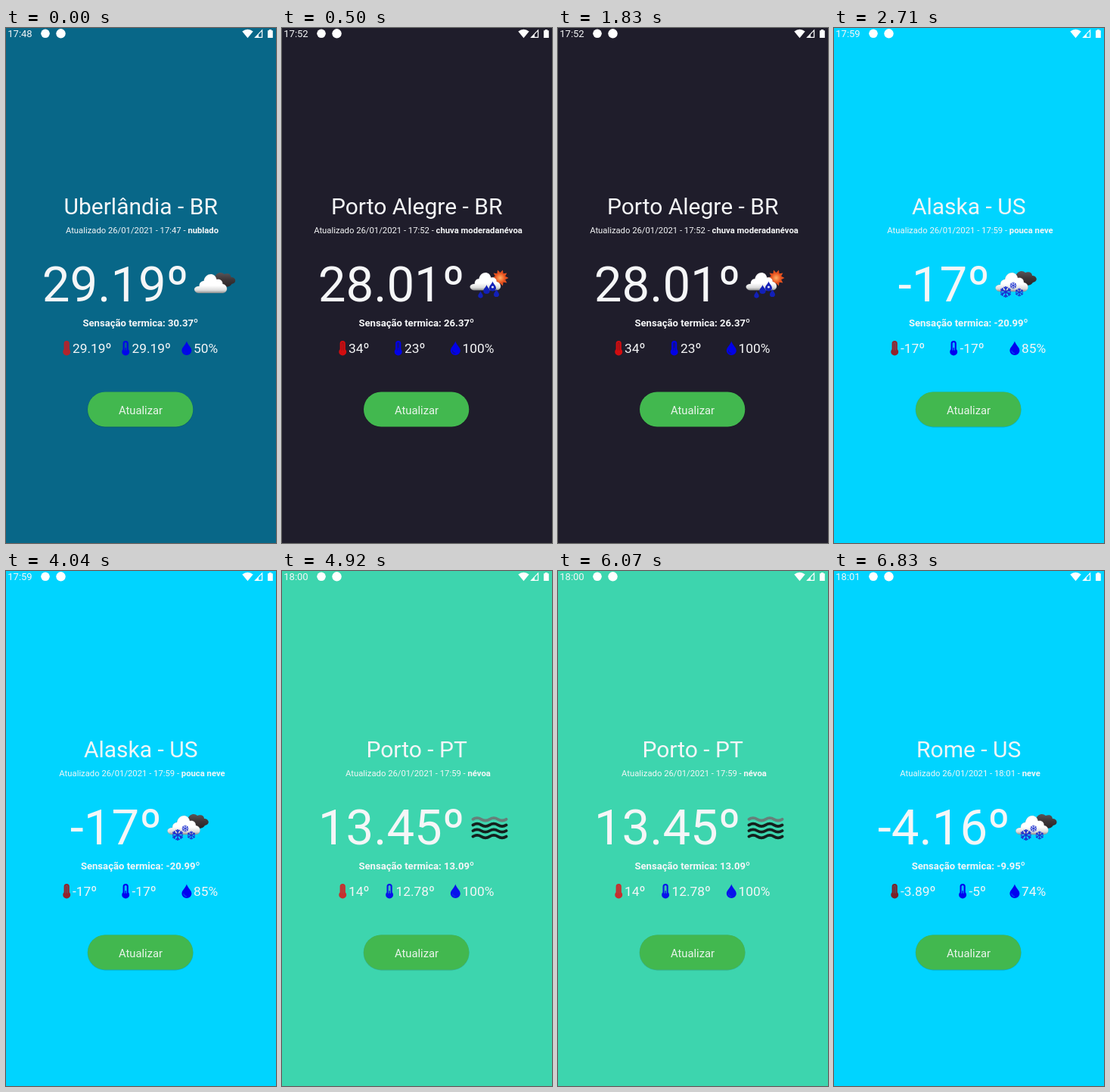
Write an HTML page that moves like this. It is 357 by 680 pixels and loops after 8 s.

```html
<!DOCTYPE html>
<html lang="pt">
<head>
<meta charset="utf-8">
<title>Clima</title>
<style>
html, body { margin: 0; width: 100%; height: 100%; overflow: hidden; background: #086788; }
svg { display: block; width: 100%; height: 100%; }
text { font-family: Roboto, sans-serif; fill: #f5f6f7; white-space: pre; }
.mid { text-anchor: middle; }
.bold { font-weight: 700; }
.city { font-size: 30px; }
.note { font-size: 11.28px; }
.temp { font-size: 65.3px; text-anchor: end; }
.feel { font-size: 13.1px; }
.stat { font-size: 17.35px; }
.label { font-size: 14.8px; fill: #e9f4ea; }
.clock { font-size: 13px; }

/* Each scene covers the previous one from its start until the loop ends. */
.scene { animation: 8s step-end infinite; }
#s1 { animation-name: show1; }
#s2 { animation-name: show2; }
#s3 { animation-name: show3; }
#s4 { animation-name: show4; }
@keyframes show1 { 0% { opacity: 0 } 6.25%, 100% { opacity: 1 } }
@keyframes show2 { 0% { opacity: 0 } 33.875%, 100% { opacity: 1 } }
@keyframes show3 { 0% { opacity: 0 } 61.5%, 100% { opacity: 1 } }
@keyframes show4 { 0% { opacity: 0 } 85.375%, 100% { opacity: 1 } }
</style>
</head>
<body>
<svg id="stage" viewBox="0 0 357 680" preserveAspectRatio="none">
  <defs>
    <linearGradient id="white" x2="0" y2="1">
      <stop offset=".6" stop-color="#fff"/>
      <stop offset=".85" stop-color="#dcdcdc"/>
      <stop offset="1" stop-color="#8d9090"/>
    </linearGradient>
    <linearGradient id="dark" x2="0" y2="1">
      <stop offset="0" stop-color="#5a5558"/>
      <stop offset=".5" stop-color="#3d3638"/>
      <stop offset="1" stop-color="#2a2426"/>
    </linearGradient>
    <radialGradient id="sun">
      <stop offset="0" stop-color="#ffb066"/>
      <stop offset="1" stop-color="#e8501c"/>
    </radialGradient>
    <path id="cloud" fill="url(#white)" stroke="#8a8a8a" stroke-opacity=".35" stroke-width=".6"
      d="M-21 11C-28 10-29 2-20 2C-20-3-17-5-14-5C-12-16 1-17 3-7C8-8 11-5 11-1C18 0 19 10 11 11Z"/>
    <path id="back" fill="url(#dark)"
      d="M0-9C2-16 9-18 13-14C18-16 22-14 22-10C29-10 30-2 23-1C21 2 18 3 14 3L5 2Z"/>
    <path id="drop" d="M0-9.3C1.3-4.5 6.5-1.2 6.5 3.2A6.5 6.1 0 0 1-6.5 3.2C-6.5-1.2-1.3-4.5 0-9.3Z"/>
    <path id="tube" d="M-3.6-6.2A3.6 3.6 0 0 1 3.6-6.2V1.6A5 4.8 0 1 1-3.6 1.6Z"/>
    <path id="flake" fill="none" stroke="#1c30d0" stroke-width="1"
      d="M0-5V5M-4.4-2.5L4.4 2.5M-4.4 2.5L4.4-2.5M-1.7-4.3L0-2.6L1.7-4.3M-1.7 4.3L0 2.6L1.7 4.3M-4.6-.6L-2.3-1.3L-3-3.6M4.6.6L2.3 1.3L3 3.6M-4.6.6L-2.3 1.3L-3 3.6M4.6-.6L2.3-1.3L3-3.6"/>
    <g id="status" fill="#fff">
      <circle cx="52" cy="7.3" r="5.8"/>
      <circle cx="72.5" cy="7.3" r="6.2"/>
      <path d="M312.3 4.6Q319.5-.9 326.7 4.6L319.5 13.2Z"/>
      <path d="M329.6 12.4H338.6V2.9Z" fill="none" stroke="#fff" stroke-width="1.2"/>
      <path d="M334 7.7V12.6H329.2Z"/>
      <path d="M346 3.3H347.8V1.9H351V3.3H352.8V13H346Z"/>
    </g>
    <g id="button">
      <rect x="107.6" y="480.5" width="140" height="46.9" rx="23.4" fill-opacity=".16"/>
      <rect x="108" y="480.6" width="139.3" height="46" rx="23" fill="#42b84f"/>
      <text class="label mid" x="178" y="510">Atualizar</text>
    </g>
  </defs>
</svg>
<script>
const scenes = [
  { bg: '#086788', time: '17:48', city: 'Uberlândia - BR', at: '17:47', sky: 'nublado',
    temp: '29.19º', feel: '30.37º', max: '29.19º', min: '29.19º', wet: '50%',
    red: '#b3242c', blue: '#0206ea', cut: .15, ring: .9, minX: 166.5, icon: 'clouds', x: 275.5 },
  { bg: '#1f1d2b', time: '17:52', city: 'Porto Alegre - BR', at: '17:52', sky: 'chuva moderadanévoa',
    temp: '28.01º', feel: '26.37º', max: '34º', min: '23º', wet: '100%',
    red: '#d20d10', blue: '#0202e6', cut: .4, ring: .5, minX: 162, icon: 'rain', x: 275.5 },
  { bg: '#00d4ff', time: '17:59', city: 'Alaska - US', at: '17:59', sky: 'pouca neve',
    temp: '-17º', feel: '-20.99º', max: '-17º', min: '-17º', wet: '85%',
    red: '#94232b', blue: '#0202f0', cut: .3, ring: .9, minX: 166.5, icon: 'snow', x: 240 },
  { bg: '#3dd5ae', time: '18:00', city: 'Porto - PT', at: '17:59', sky: 'névoa',
    temp: '13.45º', feel: '13.09º', max: '14º', min: '12.78º', wet: '100%',
    red: '#c5302f', blue: '#0812ec', cut: .15, ring: .9, minX: 150.4, icon: 'mist', x: 275.5 },
  { bg: '#00d4ff', time: '18:01', city: 'Rome - US', at: '18:01', sky: 'neve',
    temp: '-4.16º', feel: '-9.95º', max: '-3.89º', min: '-5º', wet: '74%',
    red: '#7c2229', blue: '#0202f0', cut: .3, ring: .9, minX: 178.4, icon: 'snow', x: 266.8 }
];

const use = (id, x = 0, y = 0, scale = 1, extra = '') =>
  `<use href="#${id}" transform="translate(${x} ${y}) scale(${scale})" ${extra}/>`;
const text = (cls, x, y, s) => `<text class="${cls}" x="${x}" y="${y}">${s}</text>`;
const line = (d, color, width, alpha = 1) =>
  `<path d="${d}" fill="none" stroke="${color}" stroke-width="${width}" stroke-opacity="${alpha}" stroke-linecap="round"/>`;
const group = (x, y, body) => `<g transform="translate(${x} ${y})">${body}</g>`;

function sun(x, y) {
  let d = '';
  for (let i = 0; i < 20; i++) {
    const r = i % 2 ? 7 : 11, a = i * Math.PI / 10;
    d += (i ? 'L' : 'M') + (x + r * Math.cos(a)).toFixed(2) + ' ' + (y + r * Math.sin(a)).toFixed(2);
  }
  return `<path d="${d}Z" fill="#e2501f"/><circle cx="${x}" cy="${y}" r="6.5" fill="url(#sun)"/>`;
}

const icons = {
  clouds: () => use('back') + use('cloud'),
  rain: () => sun(13, -9) + use('cloud', -2, -3, .94) +
    [[-13, 13, .5], [-5, 6, .65], [3, 2, .7], [8, 11, .55]]
      .map(([x, y, k]) => use('drop', x, y, k, 'fill="#1220b8"')).join('') +
    '<circle cx="3" cy="3" r="1.6" fill="#dfe4f6"/>',
  snow: () => use('back', 0, -2) + use('cloud', 0, -2) +
    use('flake', -13, 9.5, 1.5) + use('flake', -3, 1, .9) + use('flake', 5, 10, 1.1),
  mist: () => [-11.2, -3.6, 4, 11.6]
    .map((y, i) => line(`M-23 ${y}q5.5-3.4 11 0t11 0t11 0t11 0`, i ? '#14201d' : '#66807a', 3.8)).join('')
};

function thermometer(x, color, bg, cut, level) {
  return group(x, 422.7, use('tube', 0, 0, 1, `fill="${color}"`) +
    line('M0-6.2V4', bg, 3.1, cut) + line(`M0 ${level}V4`, color, 1.4) +
    `<circle cy="5" r="2.4" fill="${color}"/>`);
}

function humidity(x, color, bg, cut) {
  return group(x, 422.7, use('drop', 0, 0, 1, `fill="${color}"`) +
    line('M-4 3.4Q-3.6 6.5-.3 7', bg, 1.2, cut));
}

function scene(s, i) {
  const wetX = s.wet.length > 3 ? 238.4 : 248;
  return `<g class="scene" id="s${i}"><rect width="357" height="680" fill="${s.bg}"/>` +
    text('clock', 2.3, 12.4, s.time) + use('status') +
    text('city mid', 178.2, 246.2, s.city) +
    text('note mid', 180, 270.8, `Atualizado 26/01/2021 - ${s.at} - <tspan class="bold">${s.sky}</tspan>`) +
    text('temp', s.x - 34, 361.3, s.temp) +
    group(s.x, 339, icons[s.icon]()) +
    text('feel bold mid', 177.7, 393.6, 'Sensação termica: ' + s.feel) +
    thermometer(80.2, s.red, s.bg, s.cut, -6) + text('stat', 88, 429, s.max) +
    thermometer(s.minX - 8.3, s.blue, s.bg, s.ring, 0) + text('stat', s.minX, 429, s.min) +
    humidity(wetX - 9.1, s.blue, s.bg, s.cut) + text('stat', wetX, 429, s.wet) +
    use('button') + '</g>';
}

document.getElementById('stage').insertAdjacentHTML('beforeend', scenes.map(scene).join(''));
</script>
</body>
</html>
```
